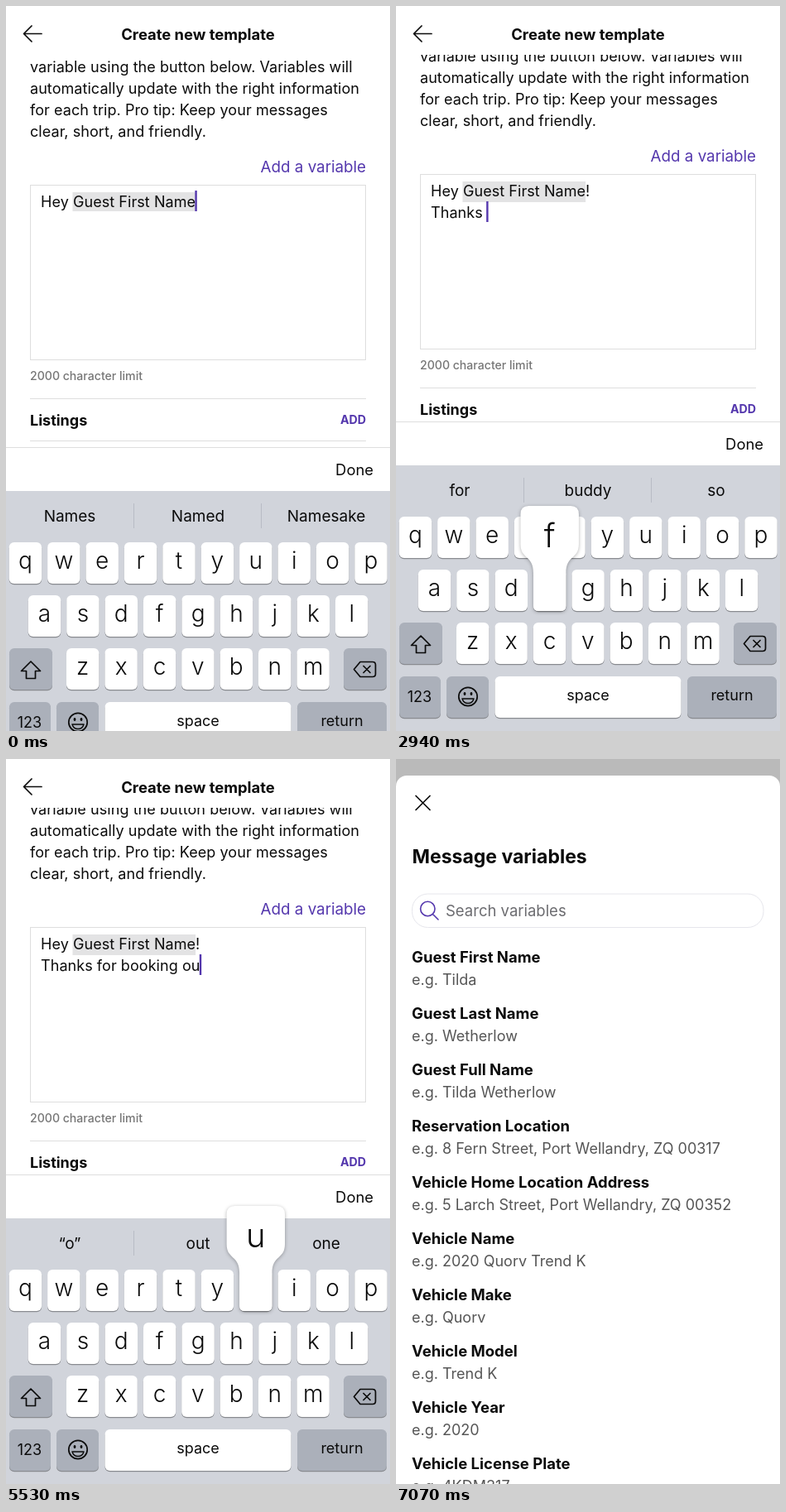
These frames come from a looping animation (464x876 px, 8000 ms). An HTML page:

```html
<!DOCTYPE html>
<html lang="en">
<head>
<meta charset="utf-8">
<title>Message template</title>
<style>
  html, body { margin: 0; width: 100%; height: 100%; overflow: hidden; background: #fff; }
  svg { display: block; width: 100vw; height: 100vh; font-family: Inter, Roboto, sans-serif; }
  text { white-space: pre; fill: #0b0b0b; font-size: 18px; }
  .body { letter-spacing: .06px; }
  .mid { text-anchor: middle; }
  .end { text-anchor: end; }
  .bold { font-weight: 700; }
  .link { fill: #5437ad; }
  .note { fill: #767676; font-size: 14.1px; font-weight: 500; }
  .sub { fill: #555; }
  .hint { fill: #6c6c70; font-size: 18.5px; }
  .word { font-size: 19px; }
  .key { font-size: 28px; font-weight: 300; }
  .sym { font-size: 27px; font-weight: 300; }
  .small { font-size: 15px; }
  .big { font-size: 40px; font-weight: 300; }
  .line { fill: none; stroke: #0b0b0b; stroke-width: 1.7; stroke-linecap: round; stroke-linejoin: round; }
  .rule { fill: none; stroke: #dedede; }
</style>
</head>
<body>
<svg id="stage" viewBox="0 0 464 876"></svg>
<script>
const LOOP = 8000, STEP = 70;
const GREY = "#abb0ba", WHITE = "#fff";

function add(parent, tag, attrs = {}, content) {
  const el = document.createElementNS("http://www.w3.org/2000/svg", tag);
  for (const k in attrs) el.setAttribute(k, attrs[k]);
  if (content !== undefined) el.textContent = content;
  parent.appendChild(el);
  return el;
}
const group = parent => add(parent, "g");
const label = (parent, x, y, str, cls = "") => add(parent, "text", { x, y, class: cls }, str);
const box = (parent, x, y, width, height, fill, rx = 0) =>
  add(parent, "rect", { x, y, width, height, fill, rx });
const stroke = (parent, d, cls = "line") => add(parent, "path", { d, class: cls });
const show = (el, on) => el.setAttribute("visibility", on ? "visible" : "hidden");
const shift = (el, y) => el.setAttribute("transform", `translate(0 ${Math.round(y)})`);

const stage = document.getElementById("stage");
box(stage, 0, 0, 464, 876, WHITE);

// Page content
const page = group(stage);
label(page, 29, -11, "Message", "bold");
[
  "Personalize your message by adding a",
  "variable using the button below. Variables will",
  "automatically update with the right information",
  "for each trip. Pro tip: Keep your messages",
  "clear, short, and friendly."
].forEach((s, i) => label(page, 29, 41 + i * 26, s, "body"));
label(page, 435, 188, "Add a variable", "end link").style.fontSize = "18.8px";
add(page, "rect", { x: 29.5, y: 203.5, width: 405, height: 211, class: "rule" });
const mark = box(page, 80, 212, 152, 23, "#e3e3e4");
const lines = [230, 256].map(y => label(page, 42, y, "", "body"));
const caret = box(page, 0, 0, 2.4, 25, "#5437ad");
label(page, 29, 439, "2000 character limit", "note");
stroke(page, "M29 461.5H435M29 512.5H435", "rule");
label(page, 29, 494, "Listings", "bold");
label(page, 435, 492, "ADD", "end link bold").style.fontSize = "14.2px";

// Header
box(stage, 0, 0, 464, 59, WHITE);
stroke(stage, "M43 33.5H22M31 24L21.5 33.5L31 43");
label(stage, 232, 41, "Create new template", "mid bold").style.fontSize = "18.4px";

// Keyboard
const board = group(stage);
box(board, 0, 502, 464, 53, WHITE);
stroke(board, "M0 502.5H464", "rule");
label(board, 444, 536, "Done", "end").style.fontSize = "18.4px";
box(board, 0, 555, 464, 400, "#d1d4db");
const words = [77, 232, 387].map(x => label(board, x, 592, "", "mid word"));
add(board, "path", { d: "M154.5 570V600M308.5 570V600", stroke: "#b8bcc5" });

function cap(parent, x, y, w, fill = WHITE) {
  box(parent, x, y + 1.3, w, 50, "#898b90", 6);
  return box(parent, x, y, w, 50, fill, 6);
}

function layout(rows, symbols, upper) {
  const g = group(board), keys = {};
  rows.forEach((row, r) => {
    const wide = symbols && r === 2;
    const w = wide ? 58 : 39.4, pitch = wide ? 65.2 : 46.4;
    const left = r === 2 ? 73 : row.length === 9 ? 26.8 : 3.7;
    [...row].forEach((ch, i) => {
      const x = left + i * pitch, y = 617 + r * 64;
      cap(g, x, y, w);
      const high = symbols || upper;
      label(g, x + w / 2, y + (high ? 35 : 32), ch, "mid " + (high ? "sym" : "key"));
      keys[ch] = { x, y, w };
    });
  });
  cap(g, 4, 745, 52, upper ? WHITE : GREY);
  if (symbols) label(g, 30, 776, "#+=", "mid small");
  else {
    const arrow = stroke(g, "M30 761L41.5 772.5H35.5V781.5H24.5V772.5H18.5Z");
    if (upper) arrow.style.fill = "#0b0b0b";
  }
  const mode = cap(g, 4, 810, 50, GREY);
  label(g, 28.5, 841, symbols ? "ABC" : "123", "mid");
  return { g, keys, mode };
}

const letters = ["qwertyuiop", "asdfghjkl", "zxcvbnm"];
const boards = {
  lower: layout(letters),
  upper: layout(letters.map(s => s.toUpperCase()), false, true),
  symbols: layout(["1234567890", "-/:;()$&@”", ".,?!’"], true)
};

cap(board, 408, 745, 52, GREY);
stroke(board, "M428 761.5H443Q446.5 761.5 446.5 765V776Q446.5 779.5 443 779.5H428L420.5 770.5ZM432 766.5L440 774.5M440 766.5L432 774.5");
cap(board, 61, 810, 51, GREY);
add(board, "circle", { cx: 87, cy: 834.5, r: 11.2, class: "line" });
add(board, "ellipse", { cx: 83, cy: 831, rx: 1.4, ry: 2.1 });
add(board, "ellipse", { cx: 91, cy: 831, rx: 1.4, ry: 2.1 });
stroke(board, "M80 837H94Q92.5 842.5 87 842.5Q81.5 842.5 80 837Z").style.strokeWidth = 1.4;
const space = cap(board, 119.5, 810, 225);
label(board, 232, 839, "space", "mid");
const enter = cap(board, 352, 810, 108, GREY);
label(board, 406, 839, "return", "mid");

const popup = group(board);
const bubble = add(popup, "path", { fill: WHITE });
bubble.style.filter = "drop-shadow(0 1px 2px rgba(0,0,0,.3))";
const glyph = label(popup, 0, 0, "", "mid big");

function placePopup(ch, { x, y, w }) {
  const l = x - 15.5, r = x + w + 15.5, e = x + w, top = y - 77;
  bubble.setAttribute("d",
    `M${l + 10} ${top}H${r - 10}Q${r} ${top} ${r} ${top + 10}V${y - 31}` +
    `C${r} ${y - 12} ${e} ${y - 18} ${e} ${y + 4}V${y + 44}q0 6 -6 6H${x + 6}q-6 0 -6-6V${y + 4}` +
    `C${x} ${y - 18} ${l} ${y - 12} ${l} ${y - 31}V${top + 10}Q${l} ${top} ${l + 10} ${top}Z`);
  glyph.setAttribute("x", x + w / 2);
  glyph.setAttribute("y", y - 27);
  glyph.textContent = ch;
}

// Variables sheet
const dim = box(stage, 0, 0, 464, 876, "#000");
const sheet = group(stage);
box(sheet, 0, 20, 464, 900, WHITE, 13);
stroke(sheet, "M24 44.5L41 61.5M41 44.5L24 61.5");
label(sheet, 19.5, 126, "Message variables", "bold").style.fontSize = "23px";
add(sheet, "rect", { x: 19.5, y: 163, width: 424.5, height: 40.5, rx: 19, fill: WHITE, stroke: "#e6e6ec" });
const lens = stroke(sheet, "M44.5 187.5L51 194M47 181A8.7 8.7 0 1 1 29.6 181A8.7 8.7 0 1 1 47 181");
lens.style.stroke = "#5437ad";
lens.style.strokeWidth = 1.6;
label(sheet, 60, 190, "Search variables", "hint");
[
  ["Guest First Name", "Tilda"],
  ["Guest Last Name", "Wetherlow"],
  ["Guest Full Name", "Tilda Wetherlow"],
  ["Reservation Location", "8 Fern Street, Port Wellandry, ZQ 00317"],
  ["Vehicle Home Location Address", "5 Larch Street, Port Wellandry, ZQ 00352"],
  ["Vehicle Name", "2020 Quorv Trend K"],
  ["Vehicle Make", "Quorv"],
  ["Vehicle Model", "Trend K"],
  ["Vehicle Year", "2020"],
  ["Vehicle License Plate", "4KDM317"]
].forEach(([name, sample], i) => {
  label(sheet, 19, 246 + i * 68, name, "bold").style.fontSize = "18.5px";
  label(sheet, 19, 273 + i * 68, "e.g. " + sample, "sub");
});

// Keystrokes: character, key down, text appears, key up
const strokes = [
  ["!", 840, 910, 980], ["\n", 1260, 1540, 1400],
  ["T", 2100, 2170, 2170], ["h", 2240, 2310, 2380], ["a", 2380, 2450, 2520],
  ["n", 2520, 2520, 2590], ["k", 2590, 2660, 2660], ["s", 2660, 2730, 2800], [" ", 2800, 2870, 2870],
  ["f", 2940, 3010, 3080], ["o", 3080, 3150, 3220], ["r", 3220, 3290, 3360], [" ", 3360, 3430, 3430],
  ["b", 3500, 3570, 3640], ["o", 3640, 3710, 3780], ["o", 3850, 3920, 3990],
  ["k", 4130, 4200, 4270], ["i", 4340, 4480, 4480], ["n", 4620, 4690, 4760],
  ["g", 4760, 4830, 4900], [" ", 4900, 4970, 4970],
  ["o", 5180, 5320, 5320], ["u", 5460, 5530, 5600], ["r", 5670, 5740, 5810], [" ", 5880, 5950, 5950]
];
const modes = [[0, "lower"], [560, "symbols"], [1820, "upper"], [2170, "lower"]];
const hints = [
  [0, "Names|Named|Namesake"], [1050, "I|Hi|I’m"], [1540, "I|The|I’m"],
  [2240, "“T”|The|This"], [2380, "“Th”|The|This"], [2520, "“Tha”|That|Thank"],
  [2590, "“Than”|Thank|Thanks"], [2730, "“Thank”|Thanks|Thank"], [2800, "Thanks|Thanksgiving|"],
  [2870, "for|buddy|so"], [3080, "“f”|for|from"], [3220, "“fo”|for|found"], [3360, "for|forward|form"],
  [3430, "the|your|all"], [3640, "“b”|being|be"], [3780, "“bo”|both|book"],
  [3990, "“boo”|book|books"], [4270, "“book”|booking|books"], [4550, "“booki”|booking|"],
  [4760, "“bookin”|booking|"], [4900, "booking|bookings|"], [4970, "with|our|the"],
  [5390, "“o”|out|one"], [5600, "“ou”|our|out"], [5810, "“our”|our|ours"],
  [5950, "car|new|own"], [6370, "||"]
];
const at = (table, t) => table.filter(row => row[0] <= t).pop()[1];
const within = (t, a, b) => t >= a && t < b;
const clamp = v => Math.max(0, Math.min(1, v));
const easeInOut = u => u < .5 ? 2 * u * u : 1 - 2 * (1 - u) ** 2;

function drawText(t) {
  const text = "Hey Guest First Name" + strokes.filter(s => s[2] <= t).map(s => s[0]).join("");
  const rows = text.split("\n");
  lines.forEach((el, i) => el.textContent = rows[i] || "");
  const start = 42 + lines[0].getSubStringLength(0, 4);
  mark.setAttribute("x", start - .5);
  mark.setAttribute("width", lines[0].getSubStringLength(4, 16) + .5);
  mark.setAttribute("height", rows.length > 1 ? 25 : 23);
  const last = rows.length - 1, n = rows[last].length;
  caret.setAttribute("x", 41.3 + (n ? lines[last].getSubStringLength(0, n) : 0));
  caret.setAttribute("y", 210 + last * 26);
  show(caret, t < 6300);
}

function drawKeys(t) {
  const mode = at(modes, t);
  for (const name in boards) show(boards[name].g, name === mode);
  at(hints, t).split("|").forEach((w, i) => words[i].textContent = w);
  const held = strokes.find(s => within(t, s[1], s[3]));
  const ch = held && held[0];
  const spot = ch && boards[mode].keys[ch];
  if (spot) placePopup(ch, spot);
  show(popup, !!spot);
  space.setAttribute("fill", ch === " " ? GREY : WHITE);
  enter.setAttribute("fill", ch === "\n" ? WHITE : GREY);
  boards.lower.mode.setAttribute("fill", within(t, 490, 560) ? WHITE : GREY);
  boards.symbols.mode.setAttribute("fill", within(t, 1680, 1820) ? WHITE : GREY);
}

function draw(time) {
  const t = Math.floor(time / STEP) * STEP;
  drawText(t);
  drawKeys(t);
  const rise = t < 350 ? Math.exp(-t / 80) : 0;
  const fall = easeInOut(clamp((t - 6297) / 350));
  shift(board, 31 * rise + 374 * fall);
  shift(page, 13 * rise + 138 * fall);
  const left = (1 - clamp((t - 6440) / 630)) ** 4;
  shift(sheet, 856 * left);
  dim.setAttribute("opacity", .27 * (1 - left));
  show(sheet, left < 1);
}

const begin = performance.now();
function tick() {
  draw((performance.now() - begin) % LOOP);
  requestAnimationFrame(tick);
}
tick();
</script>
</body>
</html>
```
